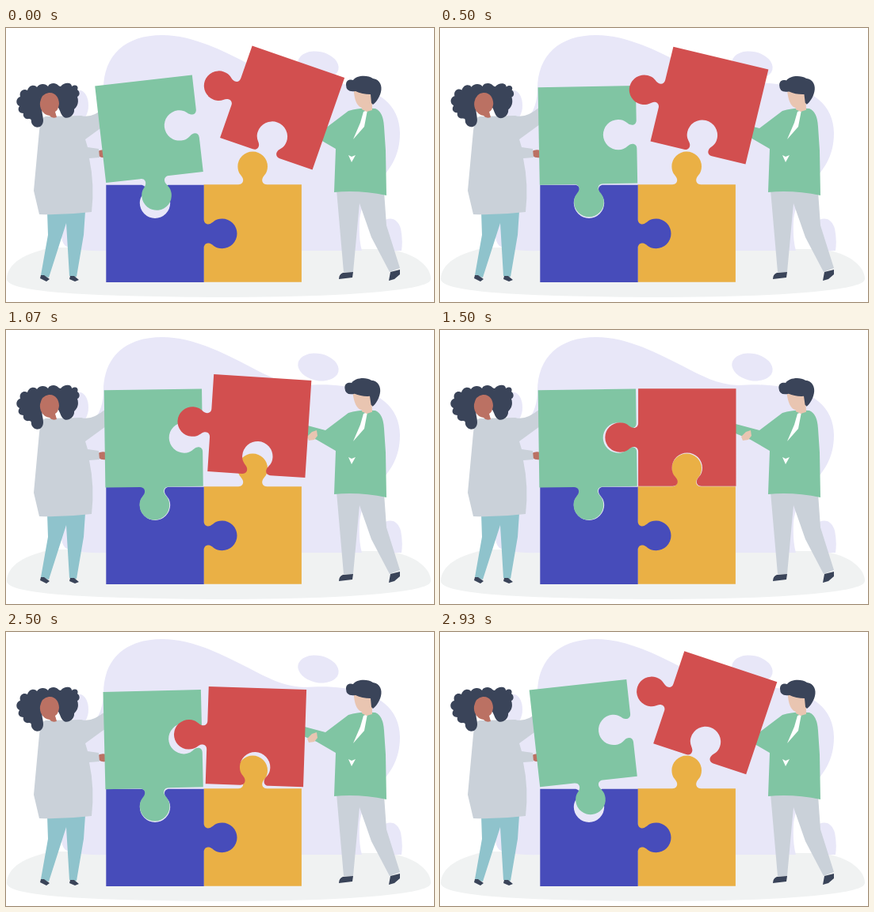
Recreate the animation shown at these times as an HTML page. Size 540 by 347 pixels, loop 3 s.

```html
<!DOCTYPE html>
<html lang="en">
<head>
<meta charset="utf-8">
<title>Puzzle teamwork</title>
<style>
  html, body { margin: 0; width: 100%; height: 100%; overflow: hidden; background: #fff; }
  svg { display: block; width: 100%; height: 100%; }
  .lilac { fill: #e8e7f8; }
  .ground { fill: #f0f2f2; }
  .dark { fill: #3a4459; }
  .green { fill: #80c5a3; }
  .red { fill: #d24f4f; }
  .yellow { fill: #eab045; }
  .blue { fill: #474cba; }
  .dress { fill: #cad1d9; }
  .jeans { fill: #8fc3cc; }
  .brown { fill: #bb7163; }
  .peach { fill: #e9c5b1; }
  .white { fill: #fff; }
</style>
</head>
<body>
<svg viewBox="0 0 540 347" xmlns="http://www.w3.org/2000/svg">
  <path class="ground" d="M1 318C1 298 25 284 60 278L480 280C515 284 536 301 536 318C536 333 420 341 269 341C120 340 1 336 1 318Z"/>
  <g class="lilac">
    <path d="M123 80C122 35 150 9 197 9C235 9 272 28 307 46C330 58 350 69 376 70C395 69 410 69 425 71C470 76 497 98 497 133C497 190 450 195 446 245Q445 268 449 282L126 282Q90 283 75 276Q66 268 72 235L88 150C95 125 121 118 123 80Z"/>
    <ellipse cx="394" cy="47" rx="26" ry="17" transform="rotate(12 394 47)"/>
    <ellipse cx="93" cy="98" rx="11" ry="19"/>
    <path d="M474 246C484 238 494 241 498 254Q501 268 499 282L474 283Z"/>
  </g>

  <g id="woman">
    <path class="jeans" d="M52 232L100 232L98 262L89 315L80 314L76 247L54 316L44 313L53 262Z"/>
    <path class="dark" d="M44 313L48 313L55 318L51 321L43 317ZM81 314L86 314L92 319L87 321L80 318Z"/>
    <path class="brown" d="M115 157Q119 153 127 155L127 164Q120 165 117 162Z"/>
    <path class="dress" d="M50 112L95 111Q108 115 126 100L126 122L100 141L103 151L117 153L118 164L105 165Q112 198 108 233Q75 237 42 236L35 206L42 130Q44 113 50 112Z"/>
    <g id="womanHead">
      <path class="dark" d="M60 70C65 70 66 74 69 74C74 68 83 69 83 74C89 70 92 75 90 78C94 81 93 86 90 87C93 96 88 101 86 103C87 111 77 117 72 112C67 107 69 100 60 96L50 97C42 103 47 108 47 117C47 126 38 128 34 123C30 119 34 115 29 115C23 116 21 111 22 108C16 108 14 103 17 99C11 96 13 88 18 87C16 80 22 76 27 79C29 72 36 71 39 75C42 70 50 70 53 74C54 71 57 70 60 70Z"/>
      <path class="brown" d="M54 82C62 81 67 88 67 96Q66 104 62 106L64 113Q58 115 55 111C46 110 42 101 43 94Q45 83 54 82Z"/>
    </g>
  </g>

  <g id="man">
    <path class="dress" d="M417 205L477 207L480 250L497 304L484 309L461 265L446 222L438 309L426 309Z"/>
    <path class="dark" d="M425 310L438 309L437 316L420 318Q420 312 425 310ZM485 309L497 306L497 312L490 318L483 320Z"/>
    <path class="green" d="M432 105Q447 100 466 102Q476 106 477 125L479 155L480 212Q446 205 414 208L416 153L392 139L373 131L373 119L403 127Z"/>
    <path class="peach" d="M380 135L386 129L392 127L393 134L389 139L382 140Z"/>
    <path class="white" d="M451 106L456 104L452 125L438 141L447 120ZM432 161L436 163L441 161L436 170Z"/>
    <g id="manHead">
      <path class="peach" d="M439 80L462 80L462 104L455 106L449 103L449 101Q441 99 439 82Z"/>
      <path class="dark" d="M429 72C429 65 435 65 438 66C442 60 456 59 463 64C472 65 475 74 473 81C471 89 466 95 463 97L461 95L460 84Q449 84 441 80Q429 82 429 72Z"/>
    </g>
  </g>

  <path id="yellow" class="yellow"/>
  <path id="blue" class="blue"/>
  <path id="green" class="green"/>
  <path id="red" class="red"/>
</svg>
<script>
const LOOP = 3000, FRAMES = 42, HALF = 61.7;
const $ = id => document.getElementById(id);

// One side of a piece, clockwise; kind is 1 for a tab, -1 for a socket, 0 for flat.
function side(index, kind) {
  const [dx, dy] = [[1, 0], [0, 1], [-1, 0], [0, -1]][index];
  const at = (along, out) => {
    const o = HALF + out * kind;
    return `${along * dx + o * dy} ${along * dy - o * dx}`;
  };
  const corner = `L${at(HALF, 0)}`;
  if (!kind) return corner;
  const r = kind > 0 ? 18.8 : 19.2;
  return `L${at(-18, 0)}C${at(-13, 0)} ${at(-11, 4)} ${at(-12.5, 8)}` +
    `C${at(-14, 12)} ${at(-r, 14)} ${at(-r, 23)}A${r} ${r} 0 0 ${kind > 0 ? 1 : 0} ${at(r, 23)}` +
    `C${at(r, 14)} ${at(14, 12)} ${at(12.5, 8)}C${at(11, 4)} ${at(13, 0)} ${at(18, 0)}${corner}`;
}

function shape(id, kinds) {
  $(id).setAttribute('d', `M${-HALF} ${-HALF}${kinds.map((k, i) => side(i, k)).join('')}Z`);
}

function place(id, [x, y, angle]) {
  $(id).setAttribute('transform', `translate(${x} ${y}) rotate(${angle})`);
}

// Smooth curve through [time, ...values] keys, resting at holds and at both ends.
function sample(keys, t) {
  let i = 0;
  while (i < keys.length - 2 && t >= keys[i + 1][0]) i++;
  const a = keys[i], b = keys[i + 1], span = b[0] - a[0], u = (t - a[0]) / span;
  const slope = (k, c) => {
    const p = keys[k - 1], q = keys[k], n = keys[k + 1];
    if (!p || !n || p[c] === q[c] || q[c] === n[c]) return 0;
    return (n[c] - p[c]) / (n[0] - p[0]);
  };
  const ease = u * u * (3 - 2 * u);
  return a.slice(1).map((v, j) => v + (b[j + 1] - v) * ease +
    span * u * (1 - u) * ((1 - u) * slope(i, j + 1) - u * slope(i + 1, j + 1)));
}

const redOpen = [348.6, 101, 19.2], redShut = [311.8, 136, 0];
const greenOpen = [180.5, 127.8, -6.5], greenShut = [186.2, 137, -0.8];
const redKeys = [
  [0, ...redOpen], [286, 345.7, 99.3, 17.4], [714, 333, 100, 9.3],
  [1071, 319.8, 121.5, 3.7], [1500, ...redShut], [2380, ...redShut], [LOOP, ...redOpen]
];
const greenKeys = [
  [0, ...greenOpen], [286, 185.8, 132.3, -2.4], [640, ...greenShut],
  [2380, ...greenShut], [LOOP, ...greenOpen]
];
const womanNod = [[0, 0], [286, 2], [714, 0], [LOOP, 0]];
const manNod = [[0, 0], [286, 0], [700, -3], [1790, -3], [2220, 0], [LOOP, 0]];

shape('yellow', [1, 0, 0, 0]);
shape('blue', [-1, 1, 0, 0]);
shape('green', [0, -1, 1, 0]);
shape('red', [0, 0, -1, 1]);
place('yellow', [311.2, 260, 0]);
place('blue', [188, 260.4, 0]);

const start = performance.now();
function draw() {
  const elapsed = (performance.now() - start) % LOOP;
  const frame = Math.floor(elapsed * FRAMES / LOOP + 0.07) % FRAMES;
  const t = frame * LOOP / FRAMES;
  place('red', sample(redKeys, t));
  place('green', sample(greenKeys, t));
  $('womanHead').setAttribute('transform', `rotate(${sample(womanNod, t)} 57 112)`);
  $('manHead').setAttribute('transform', `rotate(${sample(manNod, t)} 456 103)`);
  requestAnimationFrame(draw);
}
draw();
</script>
</body>
</html>
```
